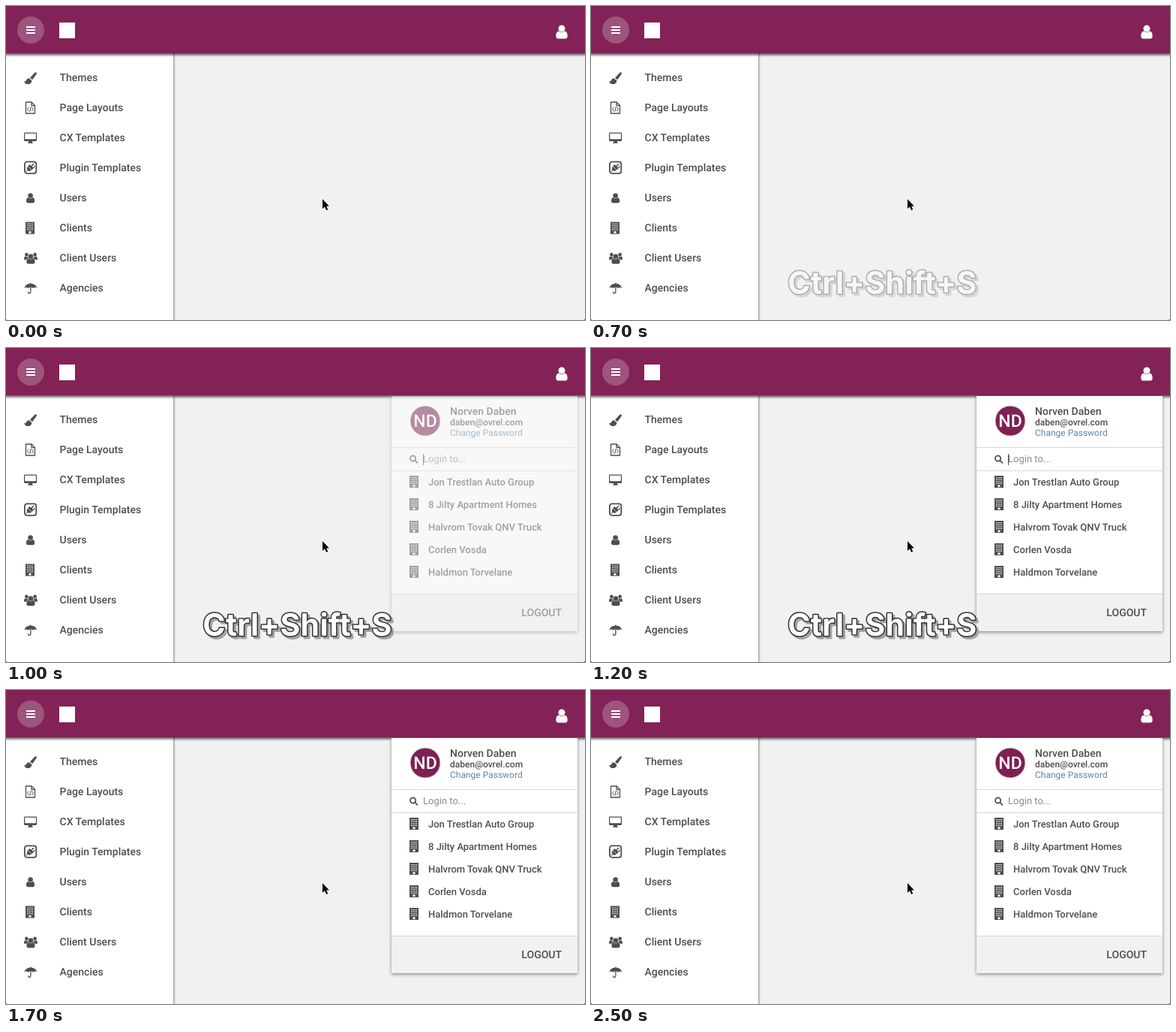
These frames come from a looping animation (772x418 px, 2.6 s). An HTML page:

```html
<!DOCTYPE html>
<html lang="en">
<head>
<meta charset="utf-8">
<title>Account menu shortcut</title>
<style>
  html, body { margin: 0; width: 100%; height: 100%; overflow: hidden; background: #777; }
  svg { display: block; width: 772px; height: 418px; }
  text { font: 500 14px Roboto, sans-serif; fill: #4e4e4e; text-rendering: geometricPrecision; }
  .small { font-size: 13px; }
  .tiny { font-size: 12px; }
  .plain { font-weight: 400; }
  .keys { font: 700 41px Inter, sans-serif; letter-spacing: .3px; stroke-linejoin: round; }
  .line { fill: none; stroke: #4e4e4e; stroke-width: 1.3; stroke-linecap: round; stroke-linejoin: round; }
  #panel, #caption, #caret { opacity: 0; }
</style>
</head>
<body>
<svg viewBox="0 0 772 418">
  <defs>
    <filter id="barShade" x="-5%" y="-20%" width="110%" height="150%">
      <feDropShadow dx="0" dy="2.5" stdDeviation="1.7" flood-opacity=".6"/>
    </filter>
    <filter id="sideShade" x="-5%" y="-5%" width="110%" height="110%">
      <feDropShadow dx="1" dy="0" stdDeviation="1.4" flood-opacity=".45"/>
    </filter>
    <filter id="panelShade" x="-5%" y="-5%" width="110%" height="110%">
      <feDropShadow dx="0" dy="1.5" stdDeviation="2" flood-opacity=".45"/>
    </filter>
    <clipPath id="frame"><path d="M0 0H772V415Q772 418 769 418H3Q0 418 0 415Z"/></clipPath>

    <g id="user">
      <circle cx="8" cy="5" r="4.7"/>
      <path d="M0 15.5C0 11 1.5 8.8 4 8.6Q8 12 12 8.6C14.5 8.8 16 11 16 15.5Q16 19 13 19H3Q0 19 0 15.5Z"/>
    </g>
    <g id="building">
      <path d="M0 0H12V16H0Z"/>
      <path d="M2 2.6H10.2M2 5.2H10.2M2 7.8H10.2M2 10.4H10.2" stroke="#fff" stroke-width="1.3" stroke-dasharray="1.25 1"/>
      <path d="M4.5 12.4H7.5V15.1H4.5Z" fill="#fff"/>
    </g>
    <g id="brush">
      <path d="M16.2.3C17.2 1 17 2 16.4 3L11.2 10.2L8 7.6L14.4.8Q15.3-.2 16.2.3Z"/>
      <path d="M7 8.4L10.4 11.2C10.3 14.8 7.5 16.2 4.6 16.1C2.1 16 .6 14.4.1 11.6C1.6 12.6 2.5 12.3 3.2 10.6Q4.5 8 7 8.4Z"/>
    </g>
    <g id="file" class="line">
      <path d="M1 1H8.6L13 5.4V16H1Z"/>
      <path d="M8.5 1.2V5.5H12.8"/>
      <path d="M4.8 8L3 10.4L4.8 12.8M9.2 8L11 10.4L9.2 12.8M7.7 7.4L6.4 13.4" stroke-width="1"/>
    </g>
    <g id="desktop">
      <path fill-rule="evenodd" d="M1.4 0H16.6Q18 0 18 1.4V10.6Q18 12 16.6 12H11.2L12 14Q12.8 14.3 12.5 15H5.5Q5.2 14.3 6 14L6.8 12H1.4Q0 12 0 10.6V1.4Q0 0 1.4 0ZM1.3 1.3V9.2H16.7V1.3Z"/>
    </g>
    <g id="plug">
      <rect class="line" x=".9" y=".9" width="15.4" height="15.4" rx="3" style="stroke-width:1.8"/>
      <path d="M5 7L10 12Q7.5 14 5 12.6L3 14.6L2.3 13.9L4.4 11.8Q3 9.3 5 7Z"/>
      <path d="M5.2 6.6L7.6 4.6L9.4 6.2L12.2 3L13.4 4.1L10.7 7.3L12 8.6L14 6L15 7.2L12.6 9.6L10.4 11.8Z"/>
    </g>
    <g id="group">
      <circle cx="3.4" cy="2.9" r="2.3"/>
      <circle cx="14.6" cy="2.9" r="2.3"/>
      <path d="M0 9.4Q0 5.4 1.7 5.2Q3.4 6.2 5 5.4Q4.8 7 5.8 7.8Q4 8.2 3.2 9.8H1.2Q0 9.8 0 9.4ZM18 9.4Q18 5.4 16.3 5.2Q14.6 6.2 13 5.4Q13.2 7 12.2 7.8Q14 8.2 14.8 9.8H16.8Q18 9.8 18 9.4Z"/>
      <use href="#user" transform="translate(3.4 2)scale(.7)"/>
    </g>
    <g id="umbrella">
      <path d="M0 7.8C.7 4 4 1.8 7.8 1.6V.4H9V1.6C12.8 1.8 16 4 16.8 7.8Q14.2 5.4 12 7.8Q8.4 4.8 4.8 7.8Q2.6 5.4 0 7.8Z"/>
      <path class="line" d="M8.4 6.5V12.8Q8.3 14.5 6.7 14.5Q5.1 14.4 5 12.8" stroke-width="1.4"/>
    </g>
  </defs>

  <g clip-path="url(#frame)">
    <rect width="772" height="418" fill="#f1f1f1"/>
    <rect x="-10" y="60" width="233" height="370" fill="#fff" filter="url(#sideShade)"/>
    <g id="menu" fill="#4e4e4e"></g>

    <rect x="-10" y="-10" width="792" height="73" fill="#822457" filter="url(#barShade)"/>
    <circle cx="33" cy="32" r="18" fill="#9d547d"/>
    <path d="M27 28H39M27 32H39M27 36H39" stroke="#fff" stroke-width="2"/>
    <rect x="71" y="22" width="21" height="21" fill="#fff"/>
    <use href="#user" transform="translate(733.3 25.2)scale(.96)" fill="#fff"/>

    <g id="panel">
      <rect x="514" y="64" width="248" height="313" fill="#fff" filter="url(#panelShade)"/>
      <path d="M514 327H762V377H514Z" fill="#f1f1f1"/>
      <path d="M514 132.5H762M514 163.5H762M514 327.5H762" stroke="#d6d6d6"/>
      <circle cx="559" cy="97" r="20" fill="#7d2153" stroke="#d8cbd2"/>
      <text x="559" y="104.5" text-anchor="middle" style="font-size:23px;fill:#fff">ND</text>
      <text x="592" y="89">Norven Daben</text>
      <text x="592" y="103" class="tiny">daben@ovrel.com</text>
      <text x="592" y="117" class="tiny plain" style="fill:#5b86a6">Change Password</text>
      <g fill="none" stroke="#4e4e4e" stroke-width="1.8">
        <circle cx="542.6" cy="147" r="3.6"/>
        <path d="M545.3 149.7L549 153.3"/>
      </g>
      <text x="556" y="152" class="small plain" style="fill:#8a8a8a">Login to...</text>
      <path id="caret" d="M556.5 141V156" stroke="#444"/>
      <g id="clients" fill="#4e4e4e"></g>
      <text x="741" y="357" text-anchor="end">LOGOUT</text>
    </g>

    <path d="M422 257V270L425 267.3L427.1 272.1L429.3 271.1L427.2 266.4H431Z"
          fill="#000" stroke="#fff" stroke-width="1.6" paint-order="stroke"/>

    <g id="caption">
      <text class="keys" x="265.3" y="386" style="fill:#a3a3a3;stroke:#a3a3a3;stroke-width:3">Ctrl+Shift+S</text>
      <text class="keys" x="262.3" y="383" paint-order="stroke" style="fill:#fff;stroke:#333;stroke-width:3">Ctrl+Shift+S</text>
    </g>
  </g>
</svg>
<script>
  const LOOP = 2600;
  const byId = id => document.getElementById(id);

  // icon, left, top relative to the row centre, scale, label
  const menu = [
    ['brush', 24, -7, 1, 'Themes'],
    ['file', 25.5, -8, 1, 'Page Layouts'],
    ['desktop', 24, -6.5, .95, 'CX Templates'],
    ['plug', 24, -8.5, 1, 'Plugin Templates'],
    ['user', 27, -6, .7, 'Users'],
    ['building', 26, -7.5, 1, 'Clients'],
    ['group', 24, -7, 1, 'Client Users'],
    ['umbrella', 24.5, -7, 1, 'Agencies']
  ];
  const clients = [
    'Jon Trestlan Auto Group',
    '8 Jilty Apartment Homes',
    'Halvrom Tovak QNV Truck',
    'Corlen Vosda',
    'Haldmon Torvelane'
  ];

  byId('menu').innerHTML = menu.map(([icon, x, dy, scale, label], i) => {
    const y = 95 + 40 * i;
    return `<use href="#${icon}" transform="translate(${x} ${y + dy})scale(${scale})"/>
      <text x="71.5" y="${y + 5}">${label}</text>`;
  }).join('');

  byId('clients').innerHTML = clients.map((label, i) => {
    const y = 178 + 30 * i;
    return `<use href="#building" x="538" y="${y - 8}"/>
      <text class="small" x="563" y="${y + 5}">${label}</text>`;
  }).join('');

  // Each step is [ms, opacity], held until the next one.
  const steps = {
    caption: [[0, 0], [700, .35], [800, .7], [900, 1], [1500, .8], [1600, .5], [1700, 0]],
    panel: [[0, 0], [1000, .5], [1100, 1]],
    caret: [[0, 0], [1000, 1], [1500, 0], [2000, 1], [2500, 0]]
  };

  for (const [id, list] of Object.entries(steps)) {
    const keys = list.map(([ms, opacity]) => ({ offset: ms / LOOP, opacity, easing: 'steps(1, end)' }));
    keys.push({ offset: 1, opacity: list.at(-1)[1] });
    byId(id).animate(keys, { duration: LOOP, iterations: Infinity });
  }
</script>
</body>
</html>
```
